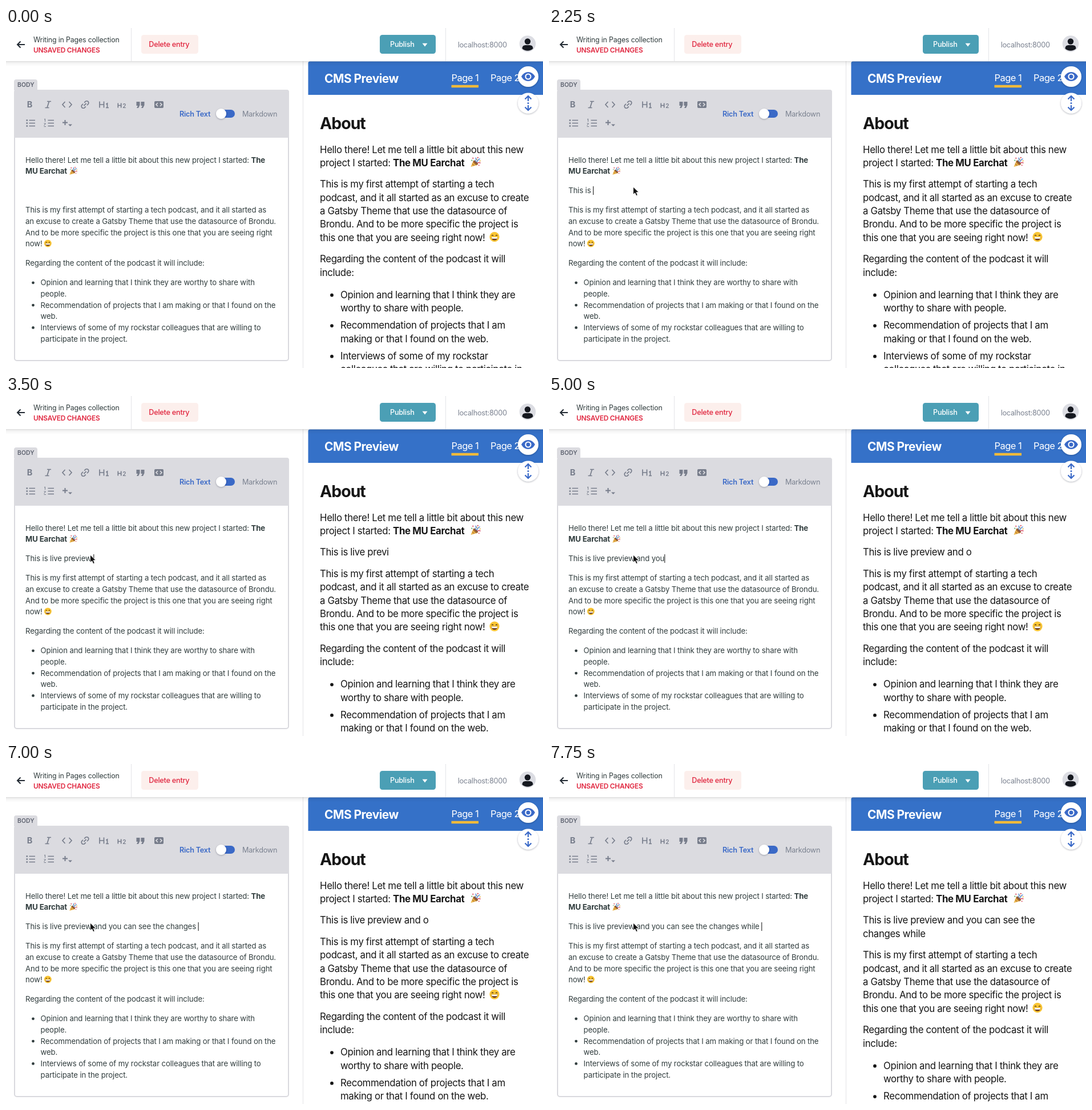
These frames come from a looping animation (941 px wide and 595 px high, 8 s). An HTML page:

```html
<!DOCTYPE html>
<html lang="en">
<head>
<meta charset="utf-8">
<title>Editor with live preview</title>
<style>
  html, body { margin: 0; width: 100%; height: 100%; overflow: hidden; background: #fff; }
  svg { display: block; }
  text { font-family: Inter, "Open Sans", sans-serif; font-optical-sizing: none; white-space: pre; }
  .b { font-weight: 700; }
  .ui { font-size: 12.7px; letter-spacing: -.02em; }
  .med { font-weight: 500; }
  .semi { font-weight: 600; }
  #edit text { font-size: 13.2px; letter-spacing: -.009em; fill: #313d3e; }
  #view text { font-size: 16.8px; letter-spacing: -.0205em; fill: #161616; }
  #view .h { font-size: 28.5px; letter-spacing: -.036em; }
  .nav { font-size: 16.5px; letter-spacing: -.034em; fill: #fff; }
  .icon { fill: none; stroke: #777d8b; stroke-width: 1.7; }
  .solid { fill: #777d8b; stroke: none; }
</style>
</head>
<body>
<svg width="941" height="595" viewBox="0 0 941 595">
  <defs>
    <linearGradient id="fade" x2="0" y2="1">
      <stop stop-color="#000" stop-opacity=".14"/>
      <stop offset=".3" stop-color="#000" stop-opacity=".05"/>
      <stop offset="1" stop-color="#000" stop-opacity="0"/>
    </linearGradient>
    <filter id="soft" x="-30%" y="-30%" width="160%" height="160%">
      <feDropShadow dx="0" dy="1" stdDeviation="1.8" flood-color="#0e1e2d" flood-opacity=".32"/>
    </filter>
    <symbol id="smile" viewBox="0 0 20 20">
      <circle cx="10" cy="10" r="9.6" fill="#f9c534"/>
      <path d="M4.5 8q1.6-3 3.2 0M12.3 8q1.6-3 3.2 0" fill="none" stroke="#5b3a17" stroke-width="1.5"/>
      <path d="M3.8 10.5h12.4q-.6 6.3-6.2 6.3t-6.2-6.3z" fill="#6b3a1c"/>
      <path d="M4.2 10.5h11.6l-.7 3H4.9z" fill="#fff"/>
    </symbol>
    <symbol id="party" viewBox="0 0 20 20">
      <path d="M1 19L6 7q6 2 8 8z" fill="#eab54a"/>
      <path d="M3.5 13l4 4M5 9.5l6.5 6.5" stroke="#b5762f" stroke-width="1.3"/>
      <ellipse cx="10" cy="11" rx="2" ry="5.3" transform="rotate(-45 10 11)" fill="#8f5a34"/>
      <path d="M9 9q3-3 1-7M12 11q1-5 6-7" fill="none" stroke="#4b83d4" stroke-width="1.5"/>
      <path d="M13 12q3-2 6 0" fill="none" stroke="#d8485c" stroke-width="1.6"/>
      <g fill="#d8485c"><circle cx="5" cy="3" r="1.2"/><circle cx="14" cy="2" r="1.2"/><circle cx="16" cy="16" r="1"/></g>
      <g fill="#e7b23c"><circle cx="18" cy="8" r="1.2"/><circle cx="12.5" cy="5.5" r="1"/></g>
      <circle cx="3" cy="7" r="1.1" fill="#59a65c"/>
    </symbol>
  </defs>

  <rect width="941" height="595" fill="#fff"/>
  <path d="M520.5 58V595" stroke="#e3e3e6"/>

  <!-- editor -->
  <path d="M14 109V94q0-4 4-4h33q4 0 4 4v15z" fill="#dbdbe0"/>
  <text x="20" y="103.4" class="semi" font-size="10.4" letter-spacing=".1" fill="#5d626f">BODY</text>
  <rect x="15" y="109" width="480" height="473" rx="4" fill="#fff" stroke="#d9d9de" stroke-width="2"/>
  <path d="M14 192V112q0-4 4-4h474q4 0 4 4v80z" fill="#dbdbe0"/>

  <g class="icon">
    <text x="36.8" y="139.3" class="b solid" font-size="14.5">B</text>
    <path d="M72 128.5h7M68.5 139.5h7M75.5 128.5l-3.5 11"/>
    <path d="M103.5 129l-4.5 5 4.5 5M110.5 129l4.5 5-4.5 5"/>
    <g transform="rotate(-45 138.5 134)">
      <path d="M137 130.7h-2.7a3.3 3.3 0 0 0 0 6.6h2.7M140 130.7h2.7a3.3 3.3 0 0 1 0 6.6h-2.7M135.5 134h6"/>
    </g>
    <path d="M164 128.5v11M171.5 128.5v11M164 134h7.5M175.5 133.5l2-1.5v7.5M175 139.5h5"/>
    <path d="M196.3 131.5v8M201.7 131.5v8M196.3 135.5h5.4"/>
    <text x="204.3" y="139.5" class="semi solid" font-size="10">2</text>
    <path class="solid" d="M228.5 129h6v6l-2.5 5h-3l2-4h-2.5zM236.5 129h6v6l-2.5 5h-3l2-4h-2.5z"/>
    <rect class="solid" x="260" y="128" width="16" height="12" rx="2"/>
    <path d="M266 131l-3 3 3 3M270 131l3 3-3 3" stroke="#dbdbe0"/>
    <path d="M40.5 161.5H51M40.5 166.5H51M40.5 171.5H51M73.5 161.5H84M73.5 166.5H84M73.5 171.5H84"/>
    <path d="M35.5 161.5h2.5M35.5 166.5h2.5M35.5 171.5h2.5" stroke-width="2.5"/>
    <path d="M67 160l1.5-1v5M66.5 167h3l-3 4M66.5 172.5h3.5" stroke-width="1"/>
    <path d="M99 165.5h9M103.5 161v9" stroke-width="2"/>
    <path class="solid" d="M109 168.5h7l-3.5 3.5z"/>
  </g>

  <text x="304" y="154.6" class="ui semi" fill="#3a69c7">Rich Text</text>
  <rect x="371" y="143" width="30" height="14" rx="7" fill="#3a69c7"/>
  <circle cx="377" cy="150" r="9" fill="#fff" filter="url(#soft)"/>
  <text x="414" y="154.6" class="ui" fill="#7b8290">Markdown</text>

  <g id="edit"></g>
  <path id="caret" d="M.5 277v15" stroke="#222" stroke-width="1.1"/>

  <!-- preview -->
  <g id="view"><g id="rest"></g></g>
  <path d="M529.5 117V61.5q0-3 3-3H941V117z" fill="#3571c8"/>
  <text x="558" y="95.7" class="b" font-size="20.9" letter-spacing="-.5" fill="#fff">CMS Preview</text>
  <text x="780.5" y="93.4" class="nav">Page 1</text>
  <text x="849" y="93.4" class="nav">Page 2</text>
  <path d="M780.5 99.8H828v4.4h-47.5z" fill="#f4ba3a"/>
  <g fill="#fff" filter="url(#soft)"><circle cx="915" cy="85" r="18"/><circle cx="915" cy="131.5" r="18"/></g>
  <g fill="#3a69c7">
    <path d="M903 85q4.5-8 12-8t12 8q-4.5 8-12 8t-12-8z"/>
    <circle cx="915" cy="85" r="5.6" fill="#fff"/>
    <circle cx="915" cy="85" r="3.5"/>
    <circle cx="915" cy="131.5" r="1.5"/>
    <path d="M909.5 124.5l5.5-5.5 5.5 5.5M915 120v8M909.5 138.5l5.5 5.5 5.5-5.5M915 143v-8" fill="none" stroke="#3a69c7" stroke-width="2.2"/>
  </g>

  <!-- top bar -->
  <path d="M0 58h941v9H0z" fill="url(#fade)"/>
  <path d="M0 0h941v58H0z" fill="#fff"/>
  <path d="M219.5 0v58M770.5 0v58" stroke="#e3e4e8"/>
  <path d="M33 29H20.5M25.5 23.5L20 29l5.5 5.5" fill="none" stroke="#222a33" stroke-width="2"/>
  <text x="48" y="25.2" font-size="12.4" letter-spacing="-.17" fill="#313d3e">Writing in Pages collection</text>
  <text x="48" y="43.1" class="semi" font-size="11.9" letter-spacing="-.22" fill="#e0263f">UNSAVED CHANGES</text>
  <rect x="237" y="12" width="100" height="33" rx="4.5" fill="#fcefec"/>
  <text x="250.3" y="33.2" class="ui med" fill="#e0263f">Delete entry</text>
  <rect x="655" y="12" width="98" height="33" rx="4.5" fill="#4b9fb5"/>
  <text x="673" y="33.2" class="ui med" fill="#fff">Publish</text>
  <path d="M729.5 26.8h9l-4.5 5.7z" fill="#fff"/>
  <text x="791.7" y="33.7" class="ui" fill="#7b8290">localhost:8000</text>
  <circle cx="914" cy="27.5" r="14.3" fill="#dcdde3"/>
  <circle cx="914" cy="23.5" r="5.2" fill="#15181f"/>
  <path d="M904.5 36q0-6 6-6h7q6 0 6 6-4 3.8-9.5 3.8t-9.5-3.8z" fill="#15181f"/>

  <path id="mouse" d="M0 0v13.5l3.1-2.9 2.2 5 2.5-1.1-2.2-4.9h4.3z" fill="#111" stroke="#fff" stroke-width=".9"/>
</svg>
<script>
const NS = 'http://www.w3.org/2000/svg';
const $ = id => document.getElementById(id);

function add(parent, tag, attrs, text) {
  const el = document.createElementNS(NS, tag);
  for (const k in attrs) el.setAttribute(k, attrs[k]);
  if (text) el.textContent = text;
  return parent.appendChild(el);
}

// Lines of text set at an even pitch.
const lines = (g, x, y, pitch, list) =>
  list.map((s, i) => add(g, 'text', { x, y: y + i * pitch }, s));
const bold = (line, s) => add(line, 'tspan', { class: 'b' }, s);
const emoji = (g, name, x, y, size) =>
  add(g, 'use', { href: '#' + name, x: x - size / 2, y: y - size / 2, width: size, height: size });

// Bulleted items of two lines each.
function bullets(g, x, y, pitch, step, dot, items) {
  items.forEach((item, i) => {
    const top = y + i * step;
    lines(g, x, top, pitch, item);
    add(g, 'circle', { cx: x - dot.gap, cy: top - dot.rise, r: dot.r, fill: dot.fill });
  });
}

const edit = $('edit'), view = $('view'), rest = $('rest');
const HELLO = 'Hello there! Let me tell a little bit about this new';

bold(lines(edit, 34, 235.8, 0, [HELLO + ' project I started: '])[0], 'The');
bold(lines(edit, 34, 255.3, 0, [''])[0], 'MU Earchat');
emoji(edit, 'party', 118, 250, 15);
const typed = lines(edit, 34, 289.4, 0, [''])[0];
lines(edit, 34, 323.4, 19.6, [
  'This is my first attempt of starting a tech podcast, and it all started as',
  'an excuse to create a Gatsby Theme that use the datasource of Brondu.',
  'And to be more specific the project is this one that you are seeing right',
  'now!'
]);
emoji(edit, 'smile', 73.3, 377, 13.5);
lines(edit, 34, 416.3, 0, ['Regarding the content of the podcast it will include:']);
bullets(edit, 60.6, 450.4, 19.6, 39.3, { gap: 13.1, rise: 4.6, r: 2.4, fill: '#313d3e' }, [
  ['Opinion and learning that I think they are worthy to share with', 'people.'],
  ['Recommendation of projects that I am making or that I found on the', 'web.'],
  ['Interviews of some of my rockstar colleagues that are willing to', 'participate in the project.']
]);

add(view, 'text', { x: 550, y: 177.3, class: 'h b' }, 'About');
const intro = lines(view, 550, 218.8, 23.4, [HELLO, 'project I started: ']);
bold(intro[1], 'The MU Earchat');
emoji(view, 'party', 823, 234.5, 19);
const live = lines(view, 550, 279.4, 23.4, ['', '']);

lines(rest, 550, 279.4, 23.3, [
  'This is my first attempt of starting a tech',
  'podcast, and it all started as an excuse to create',
  'a Gatsby Theme that use the datasource of',
  'Brondu. And to be more specific the project is',
  'this one that you are seeing right now!'
]);
emoji(rest, 'smile', 856, 365.5, 18);
lines(rest, 550, 410.2, 23.4, ['Regarding the content of the podcast it will', 'include:']);
bullets(rest, 586, 472.8, 23.4, 53.6, { gap: 15, rise: 5.3, r: 2.9, fill: '#161616' }, [
  ['Opinion and learning that I think they are', 'worthy to share with people.'],
  ['Recommendation of projects that I am', 'making or that I found on the web.'],
  ['Interviews of some of my rockstar', 'colleagues that are willing to participate in']
]);

// Start time, characters typed, characters previewed, stray letters in each.
const SENTENCE = 'This is live preview and you can see the changes while ';
const WRAP = 41;
const STEPS = [
  [0, 0, 0], [1500, 1, 0], [1750, 3, 0], [2000, 5, 0], [2250, 8, 0],
  [2500, 10, 7], [2750, 12, 7], [3000, 14, 12], [3250, 17, 12], [3500, 21, 18], [3750, 21, 20],
  [4000, 22, 20], [4250, 25, 20], [4500, 25, 20, 'o'], [4750, 25, 25, '', 'o'], [5000, 28, 25, '', 'o'],
  [5250, 29, 25, '', 'o'], [5500, 32, 25, '', 'o'], [5750, 36, 25, '', 'o'], [6000, 39, 25, '', 'o'],
  [6250, 42, 25, '', 'o'], [6500, 44, 25, '', 'o'], [6750, 47, 25, '', 'o'], [7000, 49, 25, '', 'o'],
  [7250, 51, 25, '', 'o'], [7500, 54, 50], [7750, 55, 54]
];
const MOUSE = [[0, -40, -40], [250, 270, 204], [500, 215, 297], [750, 147.5, 278]];
const LOOP = 8000;

const at = (table, t) => table.findLast(row => row[0] <= t);
let shown;

function draw(now) {
  const t = now % LOOP;
  const [, x, y] = at(MOUSE, t);
  $('mouse').setAttribute('transform', `translate(${x} ${y})`);
  $('caret').style.visibility = t < 1000 ? 'hidden' : 'visible';

  const step = at(STEPS, t);
  if (step !== shown) {
    shown = step;
    const [, n, p, slip = '', echo = ''] = step;
    typed.textContent = SENTENCE.slice(0, n) + slip;
    const end = n ? typed.getComputedTextLength() : 0;
    $('caret').setAttribute('transform', `translate(${34 + end} 0)`);
    live[0].textContent = SENTENCE.slice(0, Math.min(p, WRAP)) + echo;
    live[1].textContent = SENTENCE.slice(WRAP, p);
    const drop = p > WRAP ? 61 : p ? 37.6 : 0;
    rest.setAttribute('transform', `translate(0 ${drop})`);
  }
}

const start = performance.now();
(function tick() {
  draw(Math.max(0, performance.now() - start));
  requestAnimationFrame(tick);
})();
</script>
</body>
</html>
```
